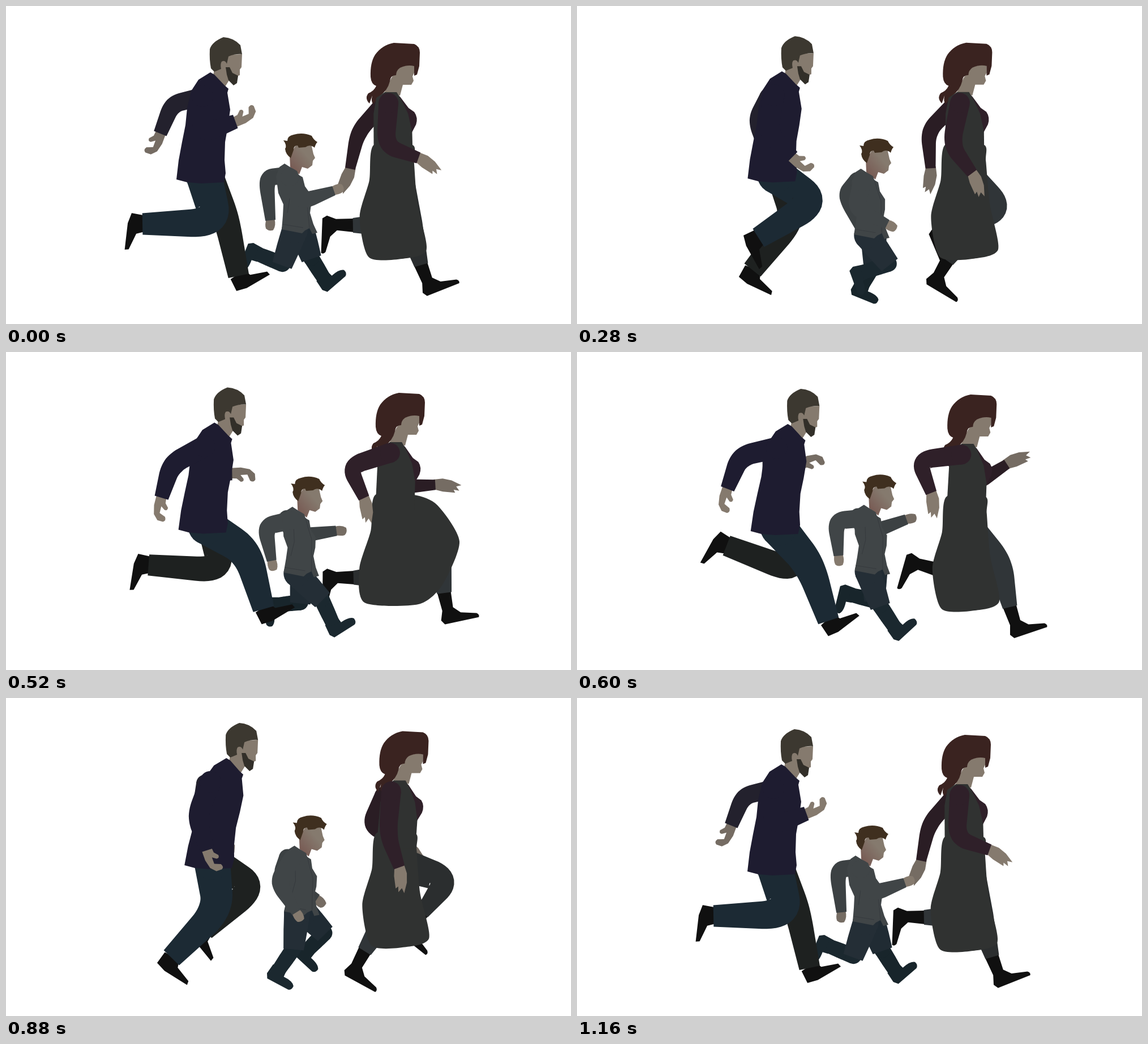
Write an HTML page with a canvas that moves like this. It is 998 px wide and 561 px high and loops after 1200 ms.

```html
<!DOCTYPE html>
<html lang="en">
<head>
<meta charset="utf-8">
<title>Running family</title>
<style>
html, body { margin: 0; width: 100%; height: 100%; overflow: hidden; background: #fff; }
canvas { display: block; }
</style>
</head>
<body>
<canvas id="stage" width="998" height="561"></canvas>
<script>
const ctx = document.getElementById('stage').getContext('2d');
const LOOP = 1200, STEP = 40;
const KEYS = 6;            // key poses per stride
const HALF = KEYS / 2;     // the far side runs half a stride later
const STRIDE = LOOP - STEP; // the last picture repeats the first pose

const mix = (a, b, u) => [a[0] + (b[0] - a[0]) * u, a[1] + (b[1] - a[1]) * u];
const polar = ([x, y], deg, len) =>
  [x + len * Math.cos(deg * Math.PI / 180), y + len * Math.sin(deg * Math.PI / 180)];
const wave = u => Math.cos(u * 2 * Math.PI / KEYS);

// Cyclic spline through evenly spaced key values.
function curve(v, u) {
  const i = Math.floor(u), f = u - i, s = 1 - f;
  const at = n => v[(i + n + KEYS) % KEYS];
  const m0 = (at(1) - at(-1)) / 2, m1 = (at(2) - at(0)) / 2;
  return at(0) * (1 + 2 * f) * s * s + at(1) * (3 - 2 * f) * f * f + f * s * (m0 * s - m1 * f);
}

// Torso path: the hips follow the neck sideways by the factor lean.
function bodyAt({ x, y, lean }, u) {
  const dx = curve(x, u), dy = curve(y, u);
  return { neck: [dx, dy], hip: [dx * lean, dy] };
}

function chain(limb, u, [dx, dy], extra = 0) {
  const p = [limb.at[0] + dx, limb.at[1] + dy];
  const k = polar(p, curve(limb.upper, u), limb.size[0]);
  const turn = curve(limb.lower, u);
  return { p, k, e: polar(k, turn, limb.size[1] + extra), turn };
}

function armAt(arm, u, shift) {
  const j = chain(arm, u, shift);
  return { ...j, turn: j.turn + arm.twist };
}

// The foot stays square to the shin and flexes while it carries weight.
function legAt(leg, u, shift, { flex, stretch = 0 }, lag = 0) {
  const j = chain(leg, u, shift, stretch * wave(u + lag));
  return { ...j, turn: j.turn - 90 - flex * (.6 - wave(u + lag - .5)) };
}

function shape(d, color) {
  ctx.fillStyle = color;
  ctx.fill(new Path2D(d));
}

// Tapered tube along a softly bent spine.
function tube(p, k, e, [w0, w1, w2], color) {
  const a = mix(p, k, .65), b = mix(k, e, .35), spine = [[p, 0]];
  for (let i = 0; i <= 12; i++) {
    const u = i / 12;
    spine.push([mix(mix(a, k, u), mix(k, b, u), u), .33 + .34 * u]);
  }
  spine.push([e, 1]);
  const left = [], right = [];
  spine.forEach(([q, u], i) => {
    const f = spine[Math.max(i - 1, 0)][0], g = spine[Math.min(i + 1, spine.length - 1)][0];
    const len = Math.hypot(g[0] - f[0], g[1] - f[1]) || 1;
    const w = (u < .5 ? w0 + (w1 - w0) * u * 2 : w1 + (w2 - w1) * (u * 2 - 1)) / 2;
    const nx = -(g[1] - f[1]) / len * w, ny = (g[0] - f[0]) / len * w;
    left.push([q[0] + nx, q[1] + ny]);
    right.unshift([q[0] - nx, q[1] - ny]);
  });
  ctx.fillStyle = color;
  ctx.beginPath();
  left.concat(right).forEach(q => ctx.lineTo(...q));
  ctx.fill();
  ctx.beginPath();
  ctx.arc(p[0], p[1], w0 / 2, 0, 7);
  ctx.fill();
}

function tip(j, d, color, flip = 1) {
  ctx.save();
  ctx.translate(...j.e);
  ctx.rotate(j.turn * Math.PI / 180);
  ctx.scale(1, flip);
  shape(d, color);
  ctx.restore();
}

function limb(j, widths, color, end, endColor, flip) {
  tip(j, end, endColor, flip);
  tube(j.p, j.k, j.e, widths, color);
}

function shifted([x, y], draw) {
  ctx.save();
  ctx.translate(x, y);
  draw();
  ctx.restore();
}

// Shears a torso so that height y0 moves with the neck and y1 with the hips.
function leaned({ neck, hip }, y0, y1, draw) {
  const c = (hip[0] - neck[0]) / (y1 - y0);
  ctx.save();
  ctx.transform(1, 0, c, 1, neck[0] - c * y0, neck[1]);
  draw();
  ctx.restore();
}

function smooth(pts, color) {
  const n = pts.length, at = i => pts[(i + n) % n];
  ctx.fillStyle = color;
  ctx.beginPath();
  ctx.moveTo(...pts[0]);
  for (let i = 0; i < n; i++) {
    const [a, b, c, d] = [at(i - 1), at(i), at(i + 1), at(i + 2)];
    ctx.bezierCurveTo(b[0] + (c[0] - a[0]) / 8, b[1] + (c[1] - a[1]) / 8,
      c[0] - (d[0] - b[0]) / 8, c[1] - (d[1] - b[1]) / 8, c[0], c[1]);
  }
  ctx.fill();
}

const SKIN = '#857a6e', DIM = '#756c63', SHOE = '#101010';
const HAND = 'M-4,-9 L9,-8 L17,-13 Q23,-12 21,-7 L15,-1 L27,1 L33,-9 Q40,-12 42,-6 L40,4 L30,11 L14,12 L-4,9Z';
const PALM = 'M-4,-9 L12,-12 L28,-10 L46,-3 L37,0 L43,7 L33,6 L36,11 L14,11 L-4,8Z';
const FIST = 'M-3,-7 Q8,-11 17,-6 Q20,2 15,7 Q8,10 -3,7Z';
const LOAFER = 'M-15,-3 L14,-3 L18,10 L46,22 L47,29 L0,26 L-18,20Z';
const BOOT = 'M-12,-2 L12,-2 L9,28 L20,40 L47,48 Q52,52 49,56 L-12,54 L-17,46 L-11,30Z';
const WELLY = 'M-13,-7 L13,-7 L14,3 Q32,2 37,9 Q38,17 32,19 L-10,20 L-15,12Z';

// Angles in degrees: 0 points ahead, 90 down, 180 back.
const manSwing = { upper: [90, 99, 106, 166, 142, 90], lower: [-20, 20, 76, 112, 78, 62] };
const man = {
  body: { x: [0, 0, 3, 10, 25, 26], y: [0, -1, -1, 10, 3, -19], lean: .5 },
  gait: { flex: 15, stretch: 13 },
  nearArm: { ...manSwing, at: [347, 159], size: [66, 62], twist: -12 },
  farArm: { ...manSwing, at: [338, 162], size: [46, 56], twist: 8 },
  nearLeg: { upper: [75, 61, 6, 46, 73, 86], lower: [179, 176, 107, 70, 118, 146], at: [350, 300], size: [85, 118] },
  farLeg: { upper: [68, 71, 76, 76, 60, 20], lower: [78, 127, 132, 200, 165, 118], at: [360, 302], size: [78, 117] }
};

function drawMan(u) {
  const body = bodyAt(man.body, u), { neck, hip } = body, coat = '#1e1c30';
  limb(armAt(man.farArm, u + HALF, hip), [32, 31, 24], '#23212d', HAND, DIM, -1);
  limb(legAt(man.farLeg, u, hip, man.gait, HALF), [50, 46, 37], '#1e2120', LOAFER, SHOE);
  limb(legAt(man.nearLeg, u, hip, man.gait), [64, 54, 38], '#1c2a34', LOAFER, SHOE);
  shifted(neck, () => {
    shape('M368,112 L380,98 L394,86 L417,85 L416,108 L413,112 L413,122 L396,128 L386,144 L366,122Z', SKIN);
    shape('M362,110 Q359,95 360,76 Q364,63 384,55 Q402,56 414,69 L417,85 Q405,84 393,89 L390,102 Q387,95 381,98 Q378,102 380,111 L368,116Z', '#3c3830');
    shape('M388,108 L395,108 L400,118 L410,123 L408,136 L402,140 L393,131 L390,121Z', '#322f29');
  });
  leaned(body, 118, 308, () => shape('M361,117 L368,121 L386,140 L393,146 L391,153 L396,183 L392,212 L387,240 L386,272 L388,295 L385,311 L345,313 L320,311 L301,306 L305,272 L311,240 L317,210 L320,180 L327,150 L340,130Z', coat));
  limb(armAt(man.nearArm, u, hip), [38, 36, 25], coat, HAND, SKIN);
}

const boySwing = { upper: [66, 78, 138, 174, 160, 90], lower: [-19, 2, 58, 84, 82, 34] };
const boy = {
  body: { x: [0, 7, 11, 14, 15, 16], y: [0, 11, 3, -8, -11, -20], lean: .25 },
  gait: { flex: 5 },
  nearArm: { ...boySwing, at: [501, 302], size: [48, 62], twist: 0 },
  farArm: { ...boySwing, at: [493, 299], size: [34, 76], twist: 10 },
  nearLeg: { upper: [110, 94, 8, 66, 92, 97], lower: [202, 200, 106, 57, 82, 160], at: [510, 396], size: [63, 50] },
  farLeg: { upper: [71, 82, 98, 92, 67, 36], lower: [58, 120, 118, 192, 165, 108], at: [522, 395], size: [52, 45] }
};

function boyLeg(j, cloth, boot) {
  tip(j, WELLY, boot);
  tube(j.k, mix(j.k, j.e, .5), j.e, [28, 27, 25], boot);
  tube(j.p, mix(j.p, j.k, .5), mix(j.p, j.k, 1.04), [46, 42, 36], cloth);
}

function drawBoy(u) {
  const body = bodyAt(boy.body, u), { neck, hip } = body, coat = '#404547';
  limb(armAt(boy.farArm, u + HALF, hip), [30, 29, 18], '#3c4143', FIST, DIM);
  boyLeg(legAt(boy.farLeg, u, hip, boy.gait, HALF), '#202b33', '#18252b');
  boyLeg(legAt(boy.nearLeg, u, hip, boy.gait), '#242e36', '#1b282f');
  shifted(neck, () => {
    const glow = ctx.createLinearGradient(503, 285, 530, 262);
    glow.addColorStop(0, '#785b54');
    glow.addColorStop(1, SKIN);
    shape('M501,262 L512,246 L539,243 L543,261 L546,268 L542,273 L541,281 L533,287 L523,284 L518,297 L502,284Z', glow);
    shape('M503,268 Q494,262 493,252 Q497,246 490,237 L497,238 Q497,229 508,227 Q524,222 540,229 Q543,236 550,240 Q547,243 545,250 Q537,243 529,249 L517,250 L515,246 Q508,246 508,254Z', '#3f2f1f');
  });
  leaned(body, 285, 395, () => {
    shape('M492,278 L500,283 L514,291 L517,298 L524,302 L528,318 L538,332 L539,350 L537,365 L543,385 L550,400 L541,402 L536,392 L528,396 L523,401 L487,394 L489,370 L490,350 L481,330 L477,300 L483,284Z', coat);
    ctx.strokeStyle = '#363a3e';
    ctx.stroke(new Path2D('M517,298 L523,315 L531,335 L533,360 L536,392 M488,385 L525,391 M497,310 L501,340 L497,365'));
  });
  limb(armAt(boy.nearArm, u, hip), [32, 31, 17], coat, FIST, SKIN);
}

const woman = {
  body: { x: [-1, -1, 5, 9, 11, 15], y: [0, 3, -3, 10, 1, -10], lean: .3 },
  gait: { flex: 5 },
  nearArm: { upper: [94, 100, 111, 174, 112, 88], lower: [20, 38, 70, 66, 108, 36], at: [676, 171], size: [76, 62], twist: 12 },
  farArm: { upper: [132, 148, 108, 50, 80, 138], lower: [102, 84, 78, -30, 0, 52], at: [662, 178], size: [60, 66], twist: 8 },
  nearLeg: { upper: [84, 74, 8, 42, 88, 100], lower: [179, 189, 107, 78, 86, 152], at: [684, 299], size: [87, 80] },
  farLeg: { upper: [75, 76, 98, 86, 45, 9], lower: [74, 121, 130, 192, 156, 105], at: [690, 299], size: [90, 74] }
};
// Front, hem and back of the skirt, hanging and lifted by the near knee.
const HANGING = [[721, 275], [727, 350], [743, 430], [700, 446], [641, 443], [625, 372]];
const LIFTED = [[770, 260], [818, 321], [775, 397], [733, 436], [628, 433], [621, 375]];

function drawWoman(u) {
  const body = bodyAt(woman.body, u), { neck, hip } = body;
  const dress = '#303231', sleeve = '#2f2029';
  const nearLeg = legAt(woman.nearLeg, u, hip, woman.gait);
  limb(armAt(woman.farArm, u, hip), [30, 28, 18], '#2a1d24', PALM, DIM);
  limb(legAt(woman.farLeg, u, hip, woman.gait, HALF), [60, 46, 25], '#2b2e2f', BOOT, SHOE);
  limb(nearLeg, [60, 46, 26], '#303538', BOOT, SHOE);
  const lift = Math.min(1, Math.max(0, (nearLeg.k[0] - 748) / 20));
  shifted(hip, () => smooth([[650, 245], [718, 245],
    ...HANGING.map((q, i) => mix(q, LIFTED[i], lift)), [642, 308]], dress));
  shifted(neck, () => {
    shape('M668,156 L681,128 L695,108 L722,102 L722,118 L719,124 L721,132 L717,139 L702,139 L697,158Z', SKIN);
    shape('M645,125 Q644,100 653,86 Q665,69 686,65 L722,67 Q732,71 732,82 L731,106 L727,121 L722,123 L722,106 Q710,103 697,109 Q690,114 690,122 Q680,122 679,133 Q675,149 661,159 L650,173 Q645,169 648,158 L643,172 Q634,163 641,154 Q651,150 655,141 Q646,138 645,125Z', '#3a2320');
  });
  leaned(body, 155, 270, () => {
    shape('M688,152 L697,160 L712,180 L722,187 Q729,197 725,209 L716,226 L690,220Z', sleeve);
    shape('M655,162 L670,152 L691,152 L699,165 L711,190 L718,222 L719,272 L650,272 L650,190Z', dress);
  });
  limb(armAt(woman.nearArm, u, hip), [35, 31, 20], sleeve, PALM, SKIN);
}

function frame() {
  const t = Math.floor(performance.now() % LOOP / STEP) * STEP;
  const u = t % STRIDE / STRIDE * KEYS;
  ctx.fillStyle = '#fff';
  ctx.fillRect(0, 0, 998, 561);
  drawWoman(u);
  drawBoy(u);
  drawMan(u);
  requestAnimationFrame(frame);
}
frame();
</script>
</body>
</html>
```
